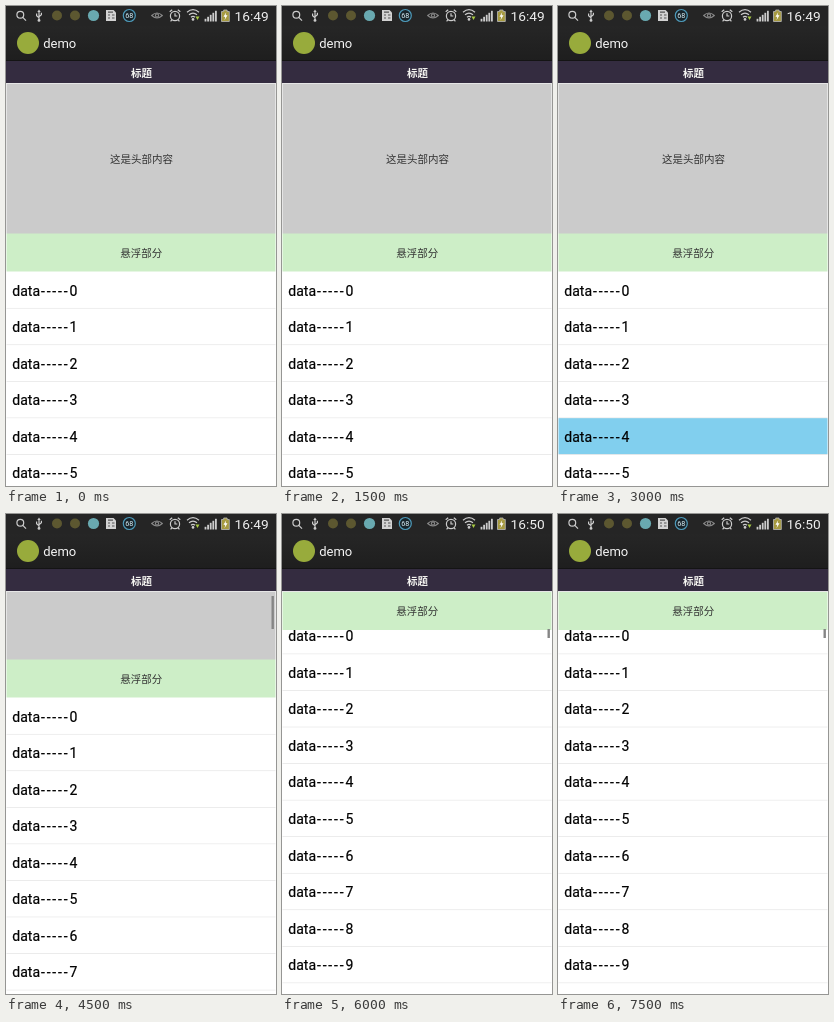
An HTML page for the animation above (8000 ms loop, 270 by 480 pixels).

```html
<!DOCTYPE html>
<html lang="zh">
<head>
<meta charset="utf-8">
<title>demo</title>
<style>
html, body { margin: 0; width: 100%; height: 100%; overflow: hidden; background: #fff; }
svg { display: block; width: 100%; height: 100%; }
text { font-family: Roboto, "Noto Sans", sans-serif; }
.cjk { font: 10.5px "Noto Sans CJK SC", "Noto Sans CJK", sans-serif; text-anchor: middle; }
.title { font-weight: 700; fill: #f4f4f0; }
.row { font-size: 14px; fill: #000; stroke: #000; stroke-width: .2; }
.dash { letter-spacing: 1.8px; }
.line { fill: none; stroke: #ccc; stroke-width: 1.2; }
</style>
</head>
<body>
<svg viewBox="0 0 270 480" preserveAspectRatio="none">
  <defs>
    <linearGradient id="bar" x2="0" y2="1">
      <stop offset="0" stop-color="#262626"/>
      <stop offset="1" stop-color="#1e1e1e"/>
    </linearGradient>
  </defs>
  <rect width="270" height="480" fill="#fff"/>
  <g id="list"></g>
  <g id="head">
    <rect y="78" width="270" height="150" fill="#cbcbcb"/>
    <text class="cjk" x="135.5" y="157" fill="#333">这是头部内容</text>
  </g>
  <g id="float">
    <rect width="270" height="38" fill="#cdeec7"/>
    <text class="cjk" x="135.2" y="23.4" fill="#333">悬浮部分</text>
  </g>
  <path d="M.5 78V480M269.5 78V480" stroke="#fff" stroke-opacity=".5"/>
  <rect id="thumb" x="265.5" width="2.4" fill="#858585"/>

  <rect width="270" height="20" fill="#252525"/>
  <rect y="20" width="270" height="35" fill="url(#bar)"/>
  <rect y="54" width="270" height="1.5" fill="#141414"/>
  <rect y="55" width="270" height="22" fill="#342c40"/>
  <rect y="77" width="270" height="1" fill="#e6e6e6"/>
  <text class="cjk title" x="135.5" y="70.6">标题</text>
  <circle cx="22" cy="37" r="11" fill="#98ab3c"/>
  <text x="37.2" y="42" font-size="13" fill="#f4f4f4">demo</text>

  <g id="status">
    <g class="line">
      <circle cx="14.3" cy="8.8" r="3.4"/>
      <path d="M16.8 11.4l3.2 3.2"/>
      <path d="M33 5v9M30.6 7.5v2.2l2.4 2M35.4 6.8v2l-2.4 2"/>
    </g>
    <path d="M33 3.4l1.7 2.6h-3.4z" fill="#ccc"/>
    <circle cx="33" cy="14.4" r="1.4" fill="#ccc"/>
    <circle cx="51" cy="9.5" r="5" fill="#5c5730"/>
    <circle cx="69" cy="9.5" r="5" fill="#5c5730"/>
    <circle cx="87.5" cy="9.5" r="5.6" fill="#69a9b0"/>
    <path d="M100 4h7.5l2.5 2.5V15H100z" fill="#d2d2d2"/>
    <path d="M102 6.2h5M102 9h2m2 0h2.5M102 12h2m2 0h2.5" stroke="#555" stroke-width="1.2"/>
    <circle cx="123.3" cy="9.5" r="6" fill="#18242a" stroke="#4e9bbb" stroke-width="1.2"/>
    <text x="123.3" y="12.1" font-size="7.2" text-anchor="middle" fill="#d8eef6">68</text>
    <g fill="none" stroke="#888" stroke-width="1.1">
      <path d="M145.7 9.5q5.3-5 10.6 0q-5.3 5-10.6 0z"/>
      <circle cx="151" cy="9.5" r="1.6"/>
    </g>
    <g class="line">
      <circle cx="169" cy="10" r="4.6"/>
      <path d="M169 7.3V10h2.3M163.7 5.8l2.5-2M174.3 5.8l-2.5-2M166 13.6l-1.4 1.7M172 13.6l1.4 1.7"/>
      <path d="M181 6.2q6-5 12 0M183 8.8q4-3.4 8 0M185 11.3q2-1.7 4 0"/>
    </g>
    <circle cx="187" cy="13.4" r="1.3" fill="#ccc"/>
    <path d="M189.5 10.5h4l-2 3.5z" fill="#a8ca42"/>
    <g id="signal" fill="#ccc"></g>
    <path d="M217.7 4h3.4v1.5h2.2V15.5h-7.8V5.5h2.2z" fill="#a69a40" stroke="#bbb" stroke-width=".8"/>
    <path d="M220.2 6.2l-2.7 4.5h1.8l-.8 3.5 3-5h-1.9z" fill="#fff"/>
    <text id="clock" x="228.5" y="14.8" font-size="13.7" fill="#eee"></text>
  </g>
</svg>
<script>
const $ = id => document.getElementById(id);
const PITCH = 36.55, LOOP = 8000, TOP = 78;

const rows = Array.from({ length: 11 }, (_, i) => {
  const y = 266 + i * PITCH;
  return `<rect id="row${i}" y="${y}" width="270" height="${PITCH}" fill="#fff"/>
    <rect y="${y + PITCH - .6}" width="270" height="1" fill="#e0e0e0"/>
    <text class="row" x="6.3" y="${y + 23.6}">data<tspan class="dash" dx="1">-----</tspan>${i}</text>`;
});
$('list').innerHTML = rows.join('');
$('signal').innerHTML = [0, 1, 2, 3, 4].map(i =>
  `<rect x="${198.6 + i * 2.6}" y="${12.8 - i * 2}" width="1.8" height="${2.7 + i * 2}"/>`).join('');

// The screen changes in hard steps.
const steps = [
  { at: 0, scroll: 0 },
  { at: 3000, scroll: 0, pressed: true },
  { at: 4500, scroll: 82, thumb: [82, 33] },
  { at: 6000, scroll: 162.3, thumb: [115, 9], clock: '16:50' }
];

function draw(t) {
  const s = steps.filter(k => k.at <= t).pop();
  const [y, h] = s.thumb || [0, 0];
  const shift = `translate(0 ${-s.scroll})`;
  $('list').setAttribute('transform', shift);
  $('head').setAttribute('transform', shift);
  $('float').setAttribute('transform', `translate(0 ${Math.max(TOP, 227.5 - s.scroll)})`);
  $('row4').setAttribute('fill', s.pressed ? '#81cfee' : '#fff');
  $('thumb').setAttribute('y', y);
  $('thumb').setAttribute('height', h);
  $('clock').textContent = s.clock || '16:49';
}

const start = performance.now();
function tick() {
  draw((performance.now() - start) % LOOP);
  requestAnimationFrame(tick);
}
tick();
</script>
</body>
</html>
```
